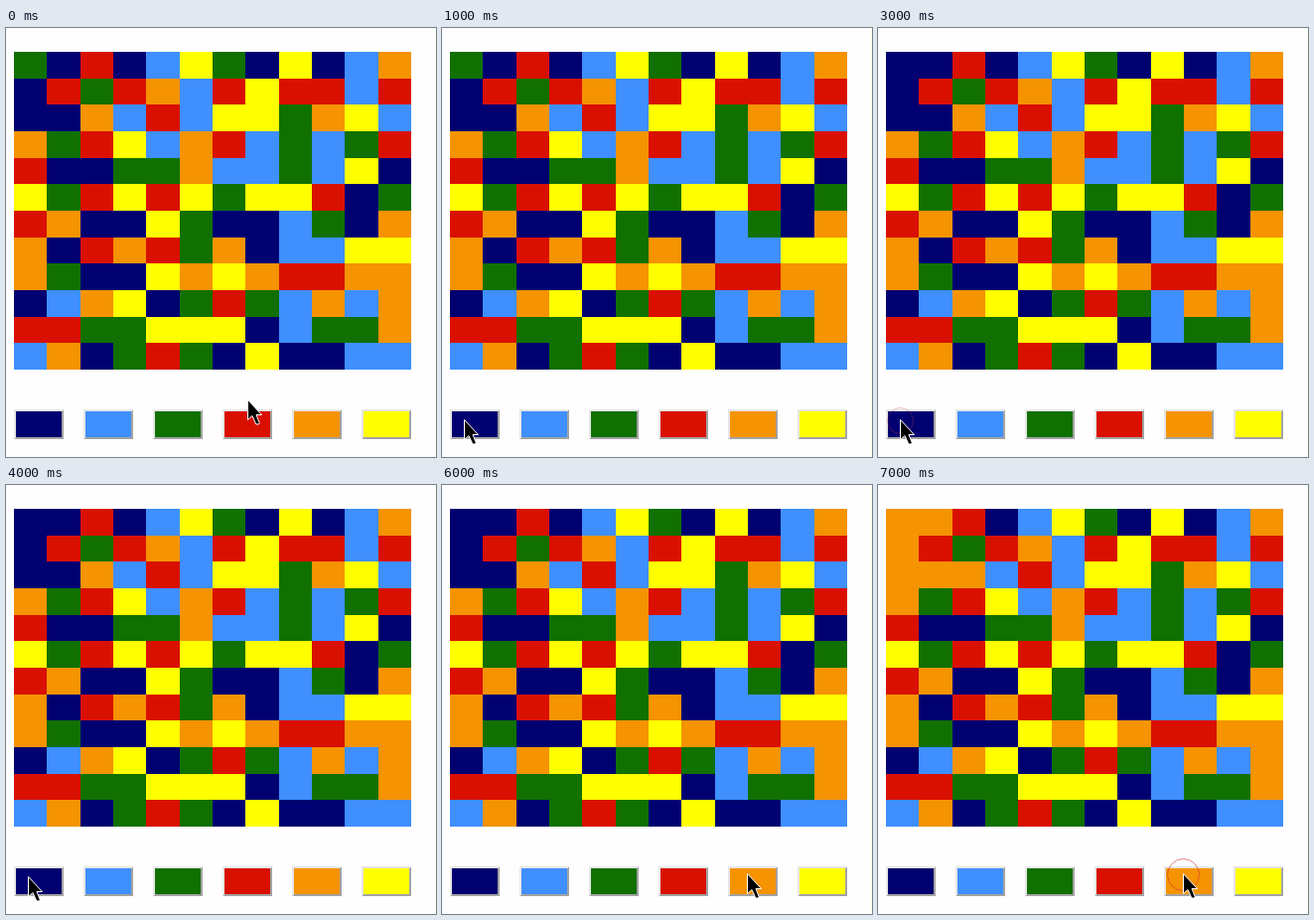
Write an HTML page that moves like this. It is 433 px wide and 432 px high and loops after 8000 ms.

```html
<!DOCTYPE html>
<html lang="en">
<head>
<meta charset="utf-8">
<title>Flood fill</title>
<style>
  html, body { margin: 0; width: 100%; height: 100%; overflow: hidden; background: #fefefe; }
  svg { display: block; width: 433px; height: 432px; }
  .seed, .joined, .cursor, .ring { animation: 8s step-end infinite; }
  .seed { animation-name: seed; }
  .joined { animation-name: joined; }
  .cursor { animation-name: move; }
  .ring { fill: none; stroke: #d63a3a; opacity: 0; }
  .first { animation-name: click1; }
  .second { animation-name: click2; }
  @keyframes seed {
    0% { fill: #107000; }
    37.5% { fill: #000070; }
    87.5%, 100% { fill: #f59300; }
  }
  @keyframes joined {
    0% { fill: #000070; }
    87.5%, 100% { fill: #f59300; }
  }
  @keyframes move {
    0% { transform: translate(243px, 374px); }
    12.5% { transform: translate(22px, 394px); }
    62.5% { transform: translate(118px, 386px); }
    75%, 100% { transform: translate(307px, 391px); }
  }
  @keyframes click1 {
    0% { opacity: 0; }
    37.5% { opacity: .35; }
    50%, 100% { opacity: 0; }
  }
  @keyframes click2 {
    0% { opacity: 0; }
    87.5%, 100% { opacity: .65; }
  }
</style>
</head>
<body>
<svg viewBox="0 0 433 432">
  <rect x="432" width="1" height="432" fill="#ffffe4"/>
  <g id="board" shape-rendering="crispEdges"></g>
  <g id="buttons" shape-rendering="crispEdges"></g>
  <circle class="ring first" cx="22.5" cy="395.5" r="13"/>
  <circle class="ring second" cx="307.5" cy="392.5" r="16"/>
  <g class="cursor">
    <path d="M.5 .5V20.5L5 16.5L8.8 25H11.5L12.2 23.5L9 15.5H14.5Z" fill="#000" stroke="#fff"/>
  </g>
</svg>
<script>
  const colors = { N: '#000070', B: '#3f8fff', G: '#107000', R: '#d91000', O: '#f59300', Y: '#ffff00' };
  const rows = [
    'GNRNBYGNYNBO', 'NRGROBRYRRBR', 'NNOBRBYYGOYB', 'OGRYBORBGBGR',
    'RNNGGOBBGBYN', 'YGRYRYGYYRNG', 'RONNYGNNBGNO', 'ONRORGONBBYY',
    'OGNNYOYORROO', 'NBOYNGRGBOBO', 'RRGGYYYNBGGO', 'BONGRGNYNNBB'
  ];
  const joined = ['0,1', '1,0', '2,0', '2,1'];
  const colX = c => Math.round(8 + c * 400 / 12);
  const rowY = r => Math.round(24 + r * 320 / 12);

  function add(parent, tag, attrs) {
    const el = document.createElementNS('http://www.w3.org/2000/svg', tag);
    for (const name in attrs) el.setAttribute(name, attrs[name]);
    document.getElementById(parent).append(el);
  }

  rows.forEach((row, r) => [...row].forEach((key, c) => {
    const group = r + c === 0 ? 'seed' : joined.includes(r + ',' + c) ? 'joined' : 'cell';
    add('board', 'rect', {
      class: group, x: colX(c), y: rowY(r),
      width: colX(c + 1) - colX(c), height: rowY(r + 1) - rowY(r), fill: colors[key]
    });
  }));

  // Raised buttons with a light and a dark bevel
  [...'NBGROY'].forEach((key, i) => {
    const x = 8 + i * 70;
    add('buttons', 'rect', { x, y: 384, width: 50, height: 30, fill: '#e6e6e6' });
    add('buttons', 'path', { d: `M${x} 414l2 -2h46v-26l2 -2v30z`, fill: '#a3a3a3' });
    add('buttons', 'rect', { x: x + 2, y: 386, width: 46, height: 26, fill: colors[key] });
  });
</script>
</body>
</html>
```
